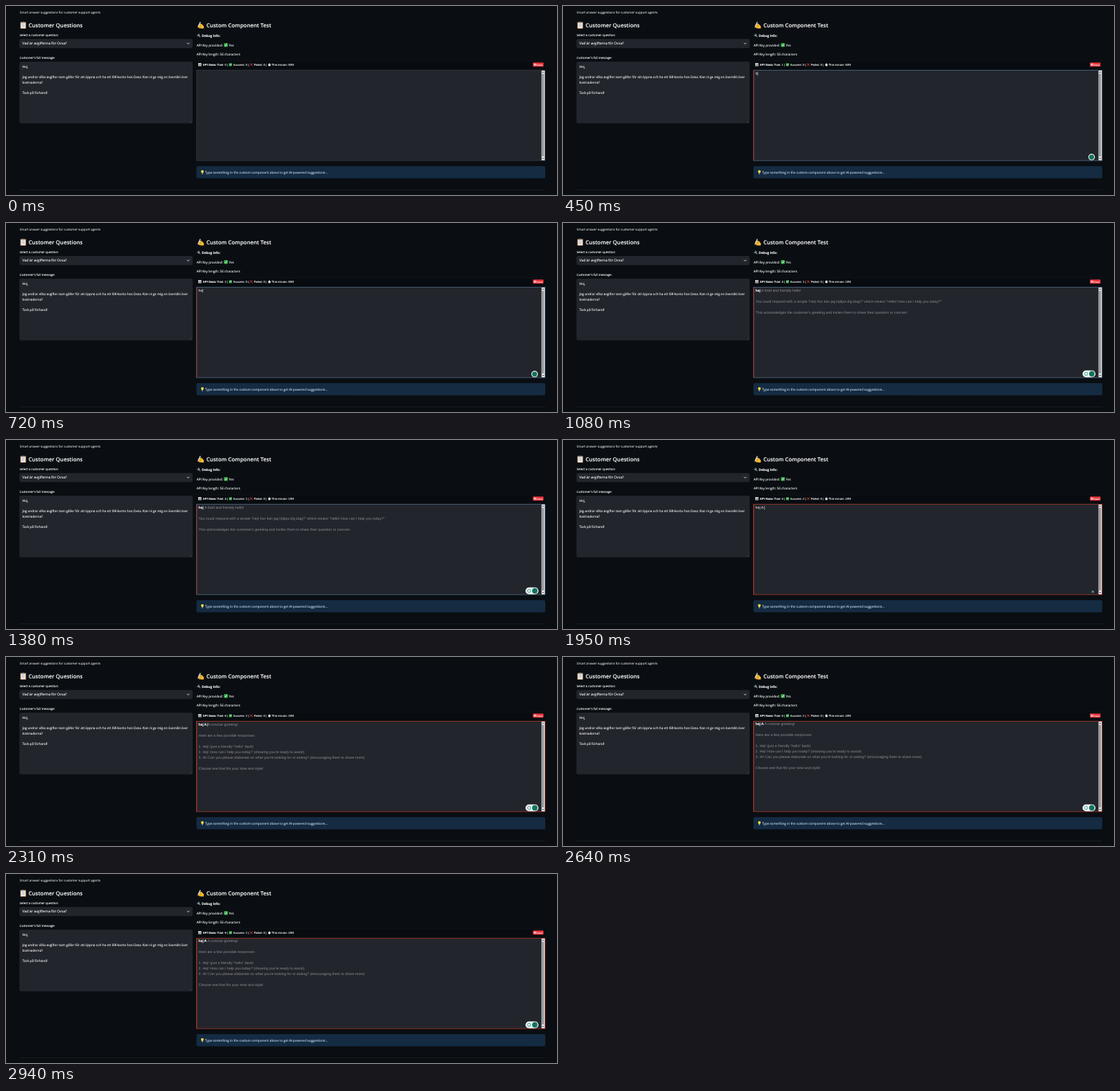
Write an HTML page that moves like this. It is 800 px wide and 275 px high and loops after 2.97 s.

```html
<!DOCTYPE html>
<html lang="en">
<head>
<meta charset="utf-8">
<title>Customer support suggestions</title>
<style>
  html, body { margin: 0; width: 100%; height: 100%; overflow: hidden; background: #0a0e12; }
  svg { display: block; width: 100vw; height: 100vh; }
  text { font: 4.72px "Open Sans", "Noto Sans", sans-serif; fill: #fafafa; white-space: pre; text-rendering: geometricPrecision; }
  #page text { stroke: #fafafa; stroke-width: .1; }
  #page .intro { font-size: 4.55px; stroke-width: .04; }
  .label { font-size: 4.43px; }
  .choice { font-size: 5.15px; }
  .heading { font-size: 7.95px; font-weight: 600; }
  .bold { font-weight: 700; }
  #page .info { fill: #c7dcec; stroke: #c7dcec; }
  .stat { font: 4.22px "Liberation Sans", Arial, sans-serif; }
  .stat.bold { font-weight: 700; }
  .reset { font: 3.3px "Liberation Sans", Arial, sans-serif; }
  .typed, .ghost { font: 5.26px "Liberation Sans", Arial, sans-serif; }
  .ghost { fill: #8b8d92; }
</style>
</head>
<body>
<svg id="stage" viewBox="0 0 800 275" preserveAspectRatio="none">
  <defs>
    <symbol id="clipboard" viewBox="0 0 10 10">
      <rect x="1" y=".8" width="8" height="9.2" rx=".7" fill="#b87947"/>
      <path d="M1.8 1.8h6.4v7.4h-6.4z" fill="#eef0f2"/>
      <path d="M3 .9h1.2a.8.8 0 0 1 1.6 0H7v1.5H3z" fill="#8f9ba3"/>
      <path d="M3 4h4M3 5.5h4M3 7h4" stroke="#8a969f" stroke-width=".5"/>
    </symbol>
    <symbol id="writing" viewBox="0 0 10 10">
      <path d="M1.6 6.3 3 3.6l2.4-.8 1.7.9 2.9 3.1v2.7l-2.6.3-4.2-.5-1-1.2z" fill="#f7bd32"/>
      <path d="m3.1 5.4 2.6-1 1.2 1M3.3 6.9l2.5-.8 1 .8M3.8 8.4l2-.5" fill="none" stroke="#bd7a1c" stroke-width=".5"/>
      <path d="M.7 8.8 1.5 6.6 4.3.4l1.3.6-2.8 6.2z" fill="#cbd5da"/>
      <path d="m.7 8.8.5-1.6.8.4z" fill="#4c5960"/>
    </symbol>
    <symbol id="wrench" viewBox="0 0 10 10">
      <path d="M8.5 8.5 3.4 3.4" stroke="#8fa9b8" stroke-width="1.9" stroke-linecap="round"/>
      <path d="M3.8 1.1a2.7 2.7 0 1 1-2.9 3" fill="none" stroke="#8fa9b8" stroke-width="1.6"/>
    </symbol>
    <symbol id="check" viewBox="0 0 10 10">
      <rect x=".5" y=".5" width="9" height="9" rx="1.2" fill="#35ad49"/>
      <path d="m2.3 5.3 2 2 3.6-4.8" fill="none" stroke="#fff" stroke-width="1.4"/>
    </symbol>
    <symbol id="chart" viewBox="0 0 10 10">
      <rect x=".3" y=".3" width="9.4" height="9.4" fill="#e9edef"/>
      <path d="M2.2 9V4" stroke="#43a047" stroke-width="1.8"/>
      <path d="M5 9V1.5" stroke="#e34238" stroke-width="1.8"/>
      <path d="M7.8 9V3" stroke="#2f83cb" stroke-width="1.8"/>
    </symbol>
    <symbol id="cross" viewBox="0 0 10 10">
      <path d="m1 1 8 8M9 1 1 9" stroke="#ef3e36" stroke-width="1.9"/>
    </symbol>
    <symbol id="timer" viewBox="0 0 10 10">
      <path d="M3.7.7h2.6M5 .7v2" stroke="#b5c0c6" stroke-width="1.2"/>
      <circle cx="5" cy="5.8" r="3.6" fill="#f3f4f4" stroke="#93a4ae"/>
      <path d="M5 6V3.6" stroke="#d04838" stroke-width=".8"/>
    </symbol>
    <symbol id="bulb" viewBox="0 0 10 10">
      <path d="M3.4 7.3C3.4 5.8 1.9 5 1.9 3.2a3.1 3.1 0 0 1 6.2 0c0 1.8-1.5 2.6-1.5 4.1z" fill="#ffdb43"/>
      <path d="M3.5 7.4h3v1.4l-.8.9H4.3l-.8-.9z" fill="#a2a9ad"/>
    </symbol>
  </defs>

  <rect width="800" height="275" fill="#0a0e12"/>
  <path d="M20 267.5H783" stroke="#20252b" stroke-width=".7"/>
  <g id="page">
    <rect x="19.5" y="48" width="251.5" height="13.2" rx="2.3" fill="#22252c"/>
    <path d="m262.7 53.6 1.8 1.8 1.8-1.8" fill="none" stroke="#e8e9ea" stroke-width=".9"/>
    <rect x="19.5" y="81" width="251.5" height="89.8" rx="2.3" fill="#22252c"/>
    <path d="m267.6 169.6 2-2m-.8 2 .8-.8" stroke="#777a80" stroke-width=".35"/>
    <rect x="276.5" y="80" width="506.5" height="11" fill="#080c10"/>
    <path d="M276.5 80H783" stroke="#171b20" stroke-width=".5"/>
    <rect x="765" y="82.3" width="15.5" height="6" rx="1" fill="#e8343b"/>
    <rect x="766.5" y="83.8" width="3" height="3" fill="#f3c4c7"/>
    <rect x="276.5" y="233.1" width="506.5" height="17.7" rx="2.3" fill="#142b42"/>
  </g>
  <g id="editor">
    <rect x="276.8" y="93.4" width="506" height="131.6" fill="#23252c"/>
    <rect x="777.6" y="93.8" width="4.8" height="130.9" fill="#f0f1f1"/>
    <rect x="778.4" y="98.5" width="2.4" height="120.5" fill="#85888c"/>
    <path d="m778.5 97.1 1.4-2 1.4 2zM778.5 221l1.4 2 1.4-2z" fill="#44474b"/>
    <rect id="border" x="276.8" y="93.4" width="506" height="131.6" fill="none" stroke-width=".75"/>
    <path id="leftEdge" d="M276.8 93.4V225" stroke="#b53a2b" stroke-width=".85"/>
    <g id="writingArea"></g>
    <path id="caret" d="M0 96V101.4" stroke="#f3f3f3" stroke-width=".55"/>
  </g>
  <g id="badge">
    <circle id="badgeSingle" cx="767.5" cy="219.8" r="4.2" fill="#11735f" stroke="#e9f1ef" stroke-width="1.2"/>
    <circle id="badgeSmall" cx="769.2" cy="220.7" r="1.8" fill="#4f8b91"/>
    <g id="badgePair">
      <rect x="754.3" y="214.4" width="18.8" height="10.2" rx="5.1" fill="#f3f5f5"/>
      <circle id="hint" cx="759.5" cy="219.5" r="2.4" fill="#d9eee8" stroke-width=".9"/>
      <circle cx="767.8" cy="219.5" r="3.9" fill="#11735f"/>
    </g>
  </g>
</svg>
<script>
const LOOP = 2970;
const TEXT_X = 279.6;
const TEXT_Y = 100.3;
const LINE = 7.92;
const $ = id => document.getElementById(id);

function add(parent, tag, attrs, content = "") {
  const node = document.createElementNS("http://www.w3.org/2000/svg", tag);
  for (const key in attrs) node.setAttribute(key, attrs[key]);
  node.textContent = content;
  parent.append(node);
  return node;
}
const page = $("page");
const label = (x, y, content, type = "") => add(page, "text", { x, y, class: type }, content);
const icon = (name, x, y, size) =>
  add(page, "use", { href: "#" + name, x, y, width: size, height: size });

label(19.7, 10.9, "Smart answer suggestions for customer support agents", "intro");
label(32.8, 30.9, "Customer Questions", "heading");
label(19.7, 44.1, "Select a customer question:", "label");
label(23.8, 56.3, "Vad är avgifterna för Ovsa?", "choice");
label(19.7, 77.1, "Customer's full message:", "label");
label(23.8, 90.2, "Hej,");
label(23.8, 105.2, "Jag undrar vilka avgifter som gäller för att öppna och ha ett ISK-konto hos Ovsa. Kan ni ge mig en översikt över");
label(23.8, 112.6, "kostnaderna?");
label(23.8, 127.6, "Tack på förhand!");
label(290.9, 30.9, "Custom Component Test", "heading");
label(284.2, 44.5, "Debug Info:", "bold");
label(276.8, 58.7, "API Key provided:");
label(323.5, 58.7, "Yes");
label(276.8, 72.1, "API Key length: 56 characters");
label(289, 243.7, "Type something in the custom component above to get AI-powered suggestions...", "info");
label(770.3, 86.5, "Reset", "reset");

icon("clipboard", 19.7, 22.5, 10.5);
icon("writing", 277, 22.5, 10.5);
icon("wrench", 277, 39.9, 5.8);
icon("check", 316.1, 53.7, 6.2);
icon("bulb", 282, 238.8, 6.2);
icon("chart", 279, 82.9, 4.9);
icon("check", 323.4, 82.9, 4.9);
icon("cross", 353.7, 82.9, 4.9);
icon("timer", 380, 82.9, 4.9);

label(285.8, 86.8, "API Stats:", "stat bold");
const total = label(306.4, 86.8, "", "stat");
const success = label(329.7, 86.8, "", "stat");
label(360, 86.8, "Failed: 0 |", "stat");
const minute = label(385.8, 86.8, "", "stat");

const area = $("writingArea");
const typed = add(area, "text", { x: TEXT_X, y: TEXT_Y, class: "typed", stroke: "#fff" });
const ghost = Array.from({ length: 9 }, (_, i) =>
  add(area, "text", { x: TEXT_X, y: TEXT_Y + i * LINE, class: "ghost" }));

const greeting = [
  "A brief and friendly hello!", "",
  "You could respond with a simple \"Hej! Hur kan jag hjälpa dig idag?\" which means \"Hello! How can I help you today?\"", "",
  "This acknowledges the customer's greeting and invites them to share their question or concern."
];
const options = [
  "A concise greeting!", "",
  "Here are a few possible responses:", "",
  "1. Hej! (just a friendly \"hello\" back)",
  "2. Hej! How can I help you today? (showing you're ready to assist)",
  "3. Hi! Can you please elaborate on what you're looking for or asking? (encouraging them to share more)", "",
  "Choose one that fits your tone and style!"
];

// Each step changes only the listed parts of the state.
const steps = [
  { at: 0, text: "", total: 0, success: 0, lines: [], border: "#393c42", left: false, caret: false, badge: "", scroll: 0 },
  { at: 180, border: "#52718c", left: true, caret: true, badge: "badgeSingle" },
  { at: 360, text: "h", total: 1 },
  { at: 600, text: "he", total: 2 },
  { at: 750, text: "hej", total: 3 },
  { at: 900, text: "hej ", total: 4 },
  { at: 990, success: 1, lines: greeting, caret: false, badge: "badgePair" },
  { at: 1440, text: "hej A", total: 5, lines: [], border: "#b53a2b", caret: true, badge: "badgeSmall" },
  { at: 1560, text: "hej A ", total: 6, success: 2 },
  { at: 1980, lines: options, badge: "badgePair" },
  { at: 2520, caret: false, scroll: -.9 }
];

function render(t) {
  const s = Object.assign({}, ...steps.filter(step => step.at <= t));
  total.textContent = `Total: ${s.total} |`;
  success.textContent = `Success: ${s.success} |`;
  minute.textContent = `This minute: ${s.success}/50`;

  typed.textContent = s.text;
  typed.setAttribute("stroke-width", s.lines.length ? .18 : 0);
  const end = TEXT_X + (s.text ? typed.getComputedTextLength() : 0);
  ghost.forEach((line, i) => line.textContent = s.lines[i] || "");
  ghost[0].setAttribute("x", end);
  area.setAttribute("transform", `translate(0 ${s.scroll})`);
  $("caret").setAttribute("transform", `translate(${end + .2} 0)`);
  $("caret").style.display = s.caret ? "" : "none";

  $("border").setAttribute("stroke", s.border);
  $("leftEdge").style.display = s.left ? "" : "none";
  for (const item of $("badge").children) item.style.display = item.id === s.badge ? "" : "none";
  $("hint").setAttribute("stroke", t >= 2520 && t < 2790 ? "#4c9ab0" : "#2b9a78");
}

const start = performance.now();
function tick() {
  render((performance.now() - start) % LOOP);
  requestAnimationFrame(tick);
}
tick();
</script>
</body>
</html>
```
